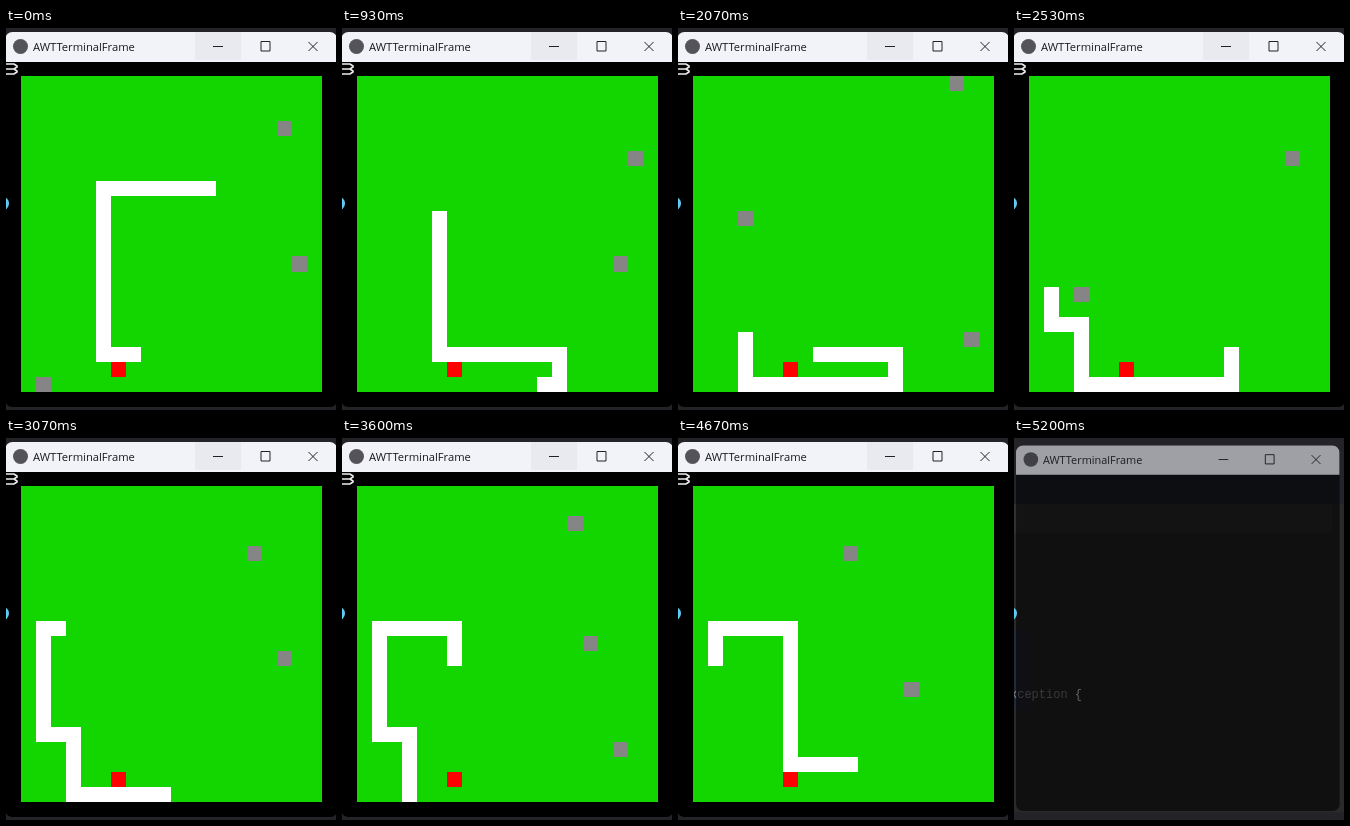
These frames come from a looping animation (330 px wide and 382 px high, 5270 ms). An HTML page:

```html
<!DOCTYPE html>
<html lang="en">
<head>
<meta charset="utf-8">
<title>Snake</title>
<style>
  html, body { margin: 0; width: 100%; height: 100%; overflow: hidden; background: #242428; }
  svg { display: block; width: 330px; height: 382px; }
  .title { font: 11.2px "Open Sans", "Noto Sans", sans-serif; fill: #1a1a1c; }
  .code { font: 12px "Liberation Mono", monospace; fill: #909090; }
  .crisp { shape-rendering: crispEdges; }
</style>
</head>
<body>
<svg viewBox="0 0 330 382">
  <rect width="330" height="382" fill="#242428"/>
  <g id="editor" visibility="hidden">
    <rect y="36" width="330" height="338" fill="#2a2a2a"/>
    <rect y="36" width="330" height="30" fill="#22252b"/>
    <rect y="66" width="318" height="29" fill="#313131"/>
    <rect y="192" width="15" height="80" fill="#242a38"/>
    <text class="code" x="68" y="260" text-anchor="end">Exception <tspan fill="#fff">{</tspan></text>
  </g>

  <g id="window">
    <rect x="-.7" y="4" width="332" height="375" rx="7" fill="#000"/>
    <path d="M-.7 34V11a7 7 0 0 1 7-7H324a7 7 0 0 1 7 7V34Z" fill="#f2f3f9"/>
    <rect id="hover" x="189" y="4" width="46" height="28" fill="#e9eaef"/>
    <circle cx="14.5" cy="18.5" r="7.5" fill="#55535a"/>
    <text class="title" x="27" y="23">AWTTerminalFrame</text>
    <path d="M207 18.5h10M255 13.5h9v9.500h-9ZM302.500 14l9 9M311.500 14l-9 9" fill="none" stroke="#222"/>

    <g id="game">
      <path d="M0 36h8l3 2v1l-3 2H0M0 41h8l3 2v1l-3 2H0" fill="none" stroke="#eee" stroke-width="1.6"/>
      <rect class="crisp" x="14.500" y="48" width="301.500" height="315.500" fill="#13d500"/>
      <g class="crisp" transform="translate(14.500 48) scale(15.070 15.040)">
        <rect x="6" y="19" width="1" height="1" fill="#f00"/>
        <g id="drops" fill="#858585"></g>
        <polyline id="snake" fill="none" stroke="#fff" stroke-width="1"
          stroke-linecap="square" stroke-linejoin="miter" transform="translate(.5 .5)"/>
      </g>
    </g>
  </g>
  <circle cx="-4" cy="175.500" r="7" fill="#62c9f5"/>
</svg>
<script>
const LOOP = 5270, FPS = 15, TICK = 94, LENGTH = 21, ROWS = 21, CLOSE = 5117;
const $ = id => document.getElementById(id);

const turns = [[12, 7], [5, 7], [5, 18], [13, 18], [13, 20], [3, 20],
               [3, 16], [1, 16], [1, 9], [6, 9], [6, 18], [17, 18]];

// Falling blocks: column and the tick at which each enters the top row.
const falls = [[1, -20], [18, -12], [17, -3], [18, 4], [3, 12],
               [17, 21], [15, 28], [14, 36], [10, 45]];

function walk(corners) {
  const cells = [corners[0]];
  for (const [tx, ty] of corners.slice(1)) {
    let [x, y] = cells[cells.length - 1];
    while (x !== tx || y !== ty) {
      x += Math.sign(tx - x);
      y += Math.sign(ty - y);
      cells.push([x, y]);
    }
  }
  return cells;
}

const path = walk(turns);

const drops = falls.map(([col, start]) => {
  const node = document.createElementNS("http://www.w3.org/2000/svg", "rect");
  node.setAttribute("x", col);
  node.setAttribute("width", 1);
  node.setAttribute("height", 1);
  $("drops").append(node);
  return { node, start };
});

function show(node, visible) {
  node.setAttribute("visibility", visible ? "inherit" : "hidden");
}

function render(ms) {
  const time = Math.floor((ms + 4) * FPS / 1000) * 1000 / FPS;
  const tick = Math.max(0, Math.floor(time / TICK - 0.15));

  $("snake").setAttribute("points", path.slice(tick, tick + LENGTH).join(" "));
  for (const { node, start } of drops) {
    const row = tick - start;
    node.setAttribute("y", row);
    show(node, row >= 0 && row < ROWS);
  }

  const closing = Math.min(1, Math.max(0, (time - CLOSE) / 83));
  const scale = 1 - 0.025 * closing;
  show($("game"), closing === 0);
  show($("hover"), closing === 0);
  show($("editor"), closing > 0);
  $("window").setAttribute("opacity", 1 - 0.4 * closing);
  $("window").setAttribute("transform",
    `translate(${2.7 * closing} ${3.5 * closing}) scale(${scale})`);
}

const begin = performance.now();
function frame() {
  render((performance.now() - begin) % LOOP);
  requestAnimationFrame(frame);
}
frame();
</script>
</body>
</html>
```
